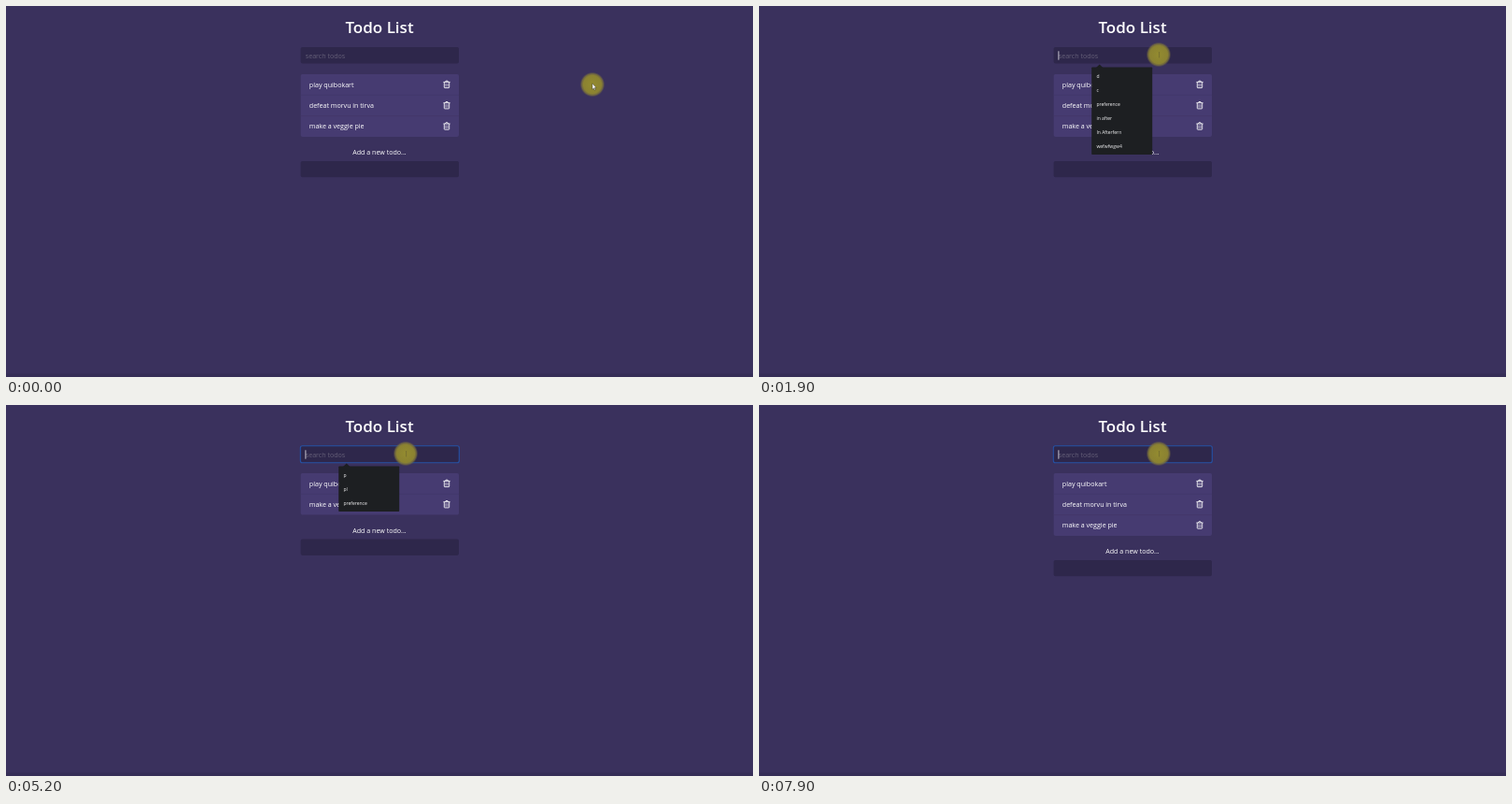
Animation, 800 px wide and 397 px high, one loop 8 s. Source, as an HTML page:

```html
<!DOCTYPE html>
<html lang="en">
<head>
<meta charset="utf-8">
<title>Todo List</title>
<style>
  html, body { margin: 0; width: 100%; height: 100%; overflow: hidden; background: #3a315d; }
  svg { display: block; width: 100%; height: 100%; }
  text { font: 7.1px "Open Sans", "Noto Sans", sans-serif; fill: #fff; white-space: pre; }
  .title { font-size: 17px; font-weight: 600; }
  .center { text-anchor: middle; }
  .field { fill: #2e274b; }
  .hint { fill: #655f78; }
  .list { fill: #463b71; }
  .rule { stroke: #3e3565; stroke-width: .5; }
  .popup rect, .popup path { fill: #1d1f22; }
  .popup text { font-size: 5px; fill: #f2f2f4; }
</style>
</head>
<body>
<svg viewBox="0 0 800 397">
  <defs>
    <radialGradient id="glow">
      <stop offset="0" stop-color="#938b30"/>
      <stop offset=".72" stop-color="#8b8231"/>
      <stop offset=".86" stop-color="#80763a" stop-opacity=".75"/>
      <stop offset="1" stop-color="#6a6040" stop-opacity="0"/>
    </radialGradient>
    <g id="trash" fill="none" stroke="#fff" stroke-width=".85">
      <path d="M-3.6-2.5H3.6M-1.6-2.6L-1-3.7H1L1.6-2.6"/>
      <path d="M-2.7-2.4V3.1Q-2.7 3.7-2.1 3.7H2.1Q2.7 3.7 2.7 3.1V-2.4"/>
      <path d="M-1-1V2.5M1-1V2.5" stroke-width=".65"/>
    </g>
  </defs>

  <rect width="800" height="397" fill="#3a315d"/>
  <rect y="393.5" width="800" height="3.5" fill="#352d56"/>
  <text class="title center" x="400" y="29">Todo List</text>

  <rect class="field" x="315.6" y="44" width="169.4" height="17.5" rx="1.8"/>
  <rect id="ring" x="315.3" y="43.7" width="170" height="18" rx="2" fill="none" stroke="#2451a4" stroke-width="1.1"/>
  <text id="hint" class="hint" x="320.8" y="55.8">search todos</text>
  <text id="typed" x="320.8" y="55.8"></text>
  <rect id="caret" y="48.3" width=".8" height="9.4" fill="#e8e6ee"/>

  <rect id="list" class="list" x="315.6" y="73" width="169.4" rx="1.8"/>
  <g id="rows"></g>
  <g id="footer">
    <text class="center" x="400" y="19">Add a new todo...</text>
    <rect class="field" x="315.6" y="26" width="169.4" height="17.3" rx="1.8"/>
  </g>

  <g id="popup" class="popup"></g>

  <g id="pointer">
    <circle r="13.3" fill="url(#glow)"/>
    <path id="arrow" d="M0-1.2V5.2L1.4 3.9 2.4 6.1 3.3 5.7 2.3 3.6H4.1Z" fill="#fff" stroke="#222" stroke-width=".4"/>
    <path id="beam" d="M.6-3V3.4" stroke="#6d6632" stroke-width=".7"/>
  </g>
</svg>

<script>
const LOOP = 8000, TICK = 100, ROW = 22.3, LIST_TOP = 73;
const todos = ["play quibokart", "defeat morvu in tirva", "make a veggie pie"];
const recent = ["d", "c", "preference", "in after", "In Afterfern", "wefwfwgw4"];
const matches = ["p", "pl", "preference"];

// Each track is a list of [time, value]; a value holds until the next time.
const typing = [[0, ""], [3100, "p"], [3900, "pl"], [5000, "p"], [5200, ""],
  [6200, "d"], [6600, "de"], [7600, "d"], [7800, ""]];
const filters = [[0, ""], [3200, "p"], [4000, "pl"], [5100, "p"], [5300, ""],
  [6400, "d"], [7900, ""]];
const carets = [[0, 0], [1900, 1], [2400, 0], [2900, 1], [3700, 0], [3900, 1],
  [4500, 0], [5000, 1], [5500, 0], [6000, 1], [7100, 0], [7600, 1]];
const fades = [[0, 0], [1900, 1], [4000, .35], [4100, .08], [4200, 0],
  [5100, 1], [5300, .35], [5400, .08], [5500, 0]];
const rings = [[0, 0], [2000, .5], [2100, 1]];
const path = [[0, 628, 84], [200, 615, 76], [300, 615, 76], [600, 578, 73],
  [700, 578, 73], [1200, 512, 28], [1600, 435, 37], [1700, 428, 52]];

const el = id => document.getElementById(id);
const at = (track, t) => track.findLast(key => key[0] <= t)[1];
const show = (id, opacity) => el(id).setAttribute("opacity", opacity);

function pointerAt(t) {
  const next = path.findIndex(p => p[0] > t);
  if (next < 0) return path.at(-1).slice(1);
  const a = path[next - 1], b = path[next], k = (t - a[0]) / (b[0] - a[0]);
  return [a[1] + (b[1] - a[1]) * k, a[2] + (b[2] - a[2]) * k];
}

function drawList(query) {
  const found = todos.filter(todo => todo.includes(query));
  const height = found.length * ROW;
  el("list").setAttribute("height", height);
  el("rows").innerHTML = found.map((todo, i) => {
    const y = LIST_TOP + i * ROW;
    const rule = i ? `<path class="rule" d="M315.6 ${y}H485"/>` : "";
    return `${rule}<text x="324.8" y="${y + 13.7}">${todo}</text>
      <use href="#trash" x="472" y="${y + 10.9}"/>`;
  }).join("");
  el("footer").setAttribute("transform", `translate(0 ${LIST_TOP + height})`);
}

function drawPopup(items, opacity) {
  const height = items.length * 15 + 3.5, middle = 65.5 + height / 2;
  const scale = opacity < 1 ? .97 : 1;
  const popup = el("popup");
  popup.innerHTML = `<path d="M361 66L364.7 62.4 368.4 66Z"/>
    <rect x="356.2" y="65.5" width="65" height="${height}" rx=".8"/>` +
    items.map((item, i) => `<text x="361.4" y="${76.8 + i * 15}">${item}</text>`).join("");
  popup.setAttribute("transform",
    `translate(388.7 ${middle}) scale(${scale}) translate(-388.7 ${-middle})`);
  show("popup", opacity);
}

function draw(t) {
  const text = at(typing, t), typed = el("typed");
  typed.textContent = text;
  show("hint", text ? 0 : 1);
  show("caret", at(carets, t));
  el("caret").setAttribute("x", 320.5 + (text ? typed.getComputedTextLength() : 0));
  show("ring", at(rings, t));
  drawList(at(filters, t));
  drawPopup(t < 3200 ? recent : matches, at(fades, t));
  el("pointer").setAttribute("transform", `translate(${pointerAt(t)})`);
  show("arrow", t < 1700 ? 1 : 0);
  show("beam", t < 1700 ? 0 : 1);
}

const start = performance.now();
let last = -1;
function frame() {
  const t = Math.floor((performance.now() - start) % LOOP / TICK) * TICK;
  if (t !== last) draw(last = t);
  requestAnimationFrame(frame);
}
frame();
</script>
</body>
</html>
```
